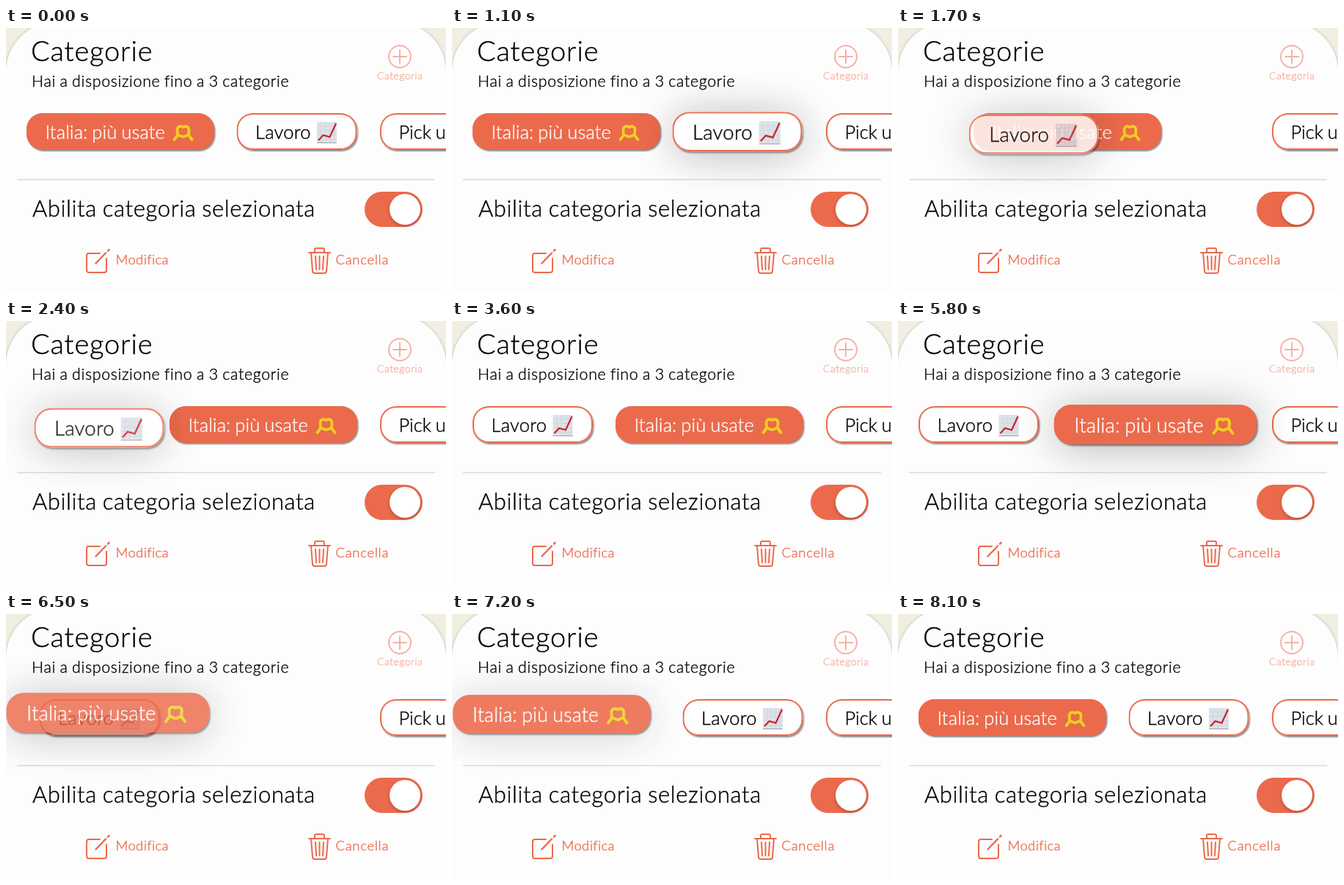
An HTML page that plays this animation: 600 px wide and 361 px high, repeating every 8200 ms.

```html
<!DOCTYPE html>
<html lang="it">
<head>
<meta charset="utf-8">
<style>
  html, body { margin: 0; width: 100%; height: 100%; overflow: hidden; background: #f0efe2; }
  #stage { position: relative; width: 600px; height: 361px; overflow: hidden; --accent: #ec6a4c; }
  svg { position: absolute; left: 0; top: 0; overflow: visible; }
  text {
    font-family: Lato, "Open Sans", sans-serif; font-weight: 300; word-spacing: -.04em;
    fill: currentColor; stroke: currentColor; stroke-width: .4px;
  }
  .icon { fill: none; stroke: var(--accent); stroke-width: 2; stroke-linecap: round; stroke-linejoin: round; }
  .accent { color: var(--accent); }
  .card {
    position: absolute; left: 0; top: -8px; width: 600px; height: 440px;
    border-radius: 68px; background: #fefdfe; box-shadow: 0 0 4px rgba(0,0,0,.2);
  }
  .toggle { position: absolute; left: 489px; top: 223px; width: 79px; height: 48px; border-radius: 24px; background: var(--accent); }
  .toggle i {
    position: absolute; left: 34px; top: 3px; width: 42px; height: 42px;
    border-radius: 50%; background: #fff; box-shadow: 0 2px 5px rgba(0,0,0,.25);
  }
  .pill {
    --lift: 0;
    position: absolute; left: 0; top: 0; height: 50px; border-radius: 22px; background: #fff; color: #000;
    box-shadow: inset 0 0 0 2px var(--accent), 1.5px 2px 2px rgba(0,0,0,.45),
      0 4px 56px rgba(0,0,0,calc(.3 * var(--lift)));
  }
  .pill text { font-size: 25.5px; }
  #italia { width: 256px; background: var(--accent); color: #fff; }
  #lavoro { width: 164px; }
  #pick { width: 190px; transform: translate(510px, 116px); }
</style>
</head>
<body>
<div id="stage">
  <div class="card"></div>
  <svg width="600" height="361">
    <path d="M15 206.500H585" stroke="#d9d8da" stroke-width="1.500"/>
    <text x="34" y="45" font-size="38" letter-spacing=".85">Categorie</text>
    <text x="35" y="79.500" font-size="21.300" letter-spacing=".7">Hai a disposizione fino a 3 categorie</text>
    <text x="36" y="257" font-size="31" letter-spacing=".63">Abilita categoria selezionata</text>
    <g class="accent">
      <g opacity=".5">
        <path class="icon" d="M522 39a15 15 0 1 0 30 0a15 15 0 1 0-30 0M528 39h18M537 30v18"/>
        <text x="506" y="70" font-size="14" letter-spacing=".5">Categoria</text>
      </g>
      <text x="149.500" y="322" font-size="18.500" letter-spacing=".4">Modifica</text>
      <text x="449.500" y="322" font-size="18.500" letter-spacing=".7">Cancella</text>
    </g>
    <g class="icon">
      <path d="M128 307H113q-3 0-3 3v20q0 3 3 3h21q3 0 3-3V314"/>
      <path d="M122.500 320.500L136 306.500M139 303.500l1.500-1.500" stroke-width="2.500"/>
      <path d="M413 306h29M421 306v-4q0-2 2-2h9q2 0 2 2v4M416 306l2 25q.2 3 3 3h13q3 0 3-3l2-25M422 311l1 18M427.500 311v18M433 311l-1 18"/>
    </g>
  </svg>
  <div class="toggle"><i></i></div>

  <div class="pill" id="pick">
    <svg><text x="25.500" y="35">Pick up</text></svg>
  </div>
  <div class="pill" id="lavoro">
    <svg>
      <text x="25.500" y="35" letter-spacing=".25">Lavoro</text>
      <g transform="translate(109.500 12)" fill="none">
        <path d="M0 0h27v29H0z" fill="#dde2e8"/>
        <path d="M0 5.500h27M0 11.500h27M0 17.500h27M0 23.500h27M5.500 0v29M11.500 0v29M17.500 0v29M23.500 0v29" stroke="#cfd7e0"/>
        <path d="M0 28.500h27" stroke="#9aa3ad"/>
        <path d="M2 25l6.500-7 9 2.500L26 2" stroke="#cb2027" stroke-width="2.200"/>
      </g>
    </svg>
  </div>
  <div class="pill" id="italia">
    <svg>
      <text x="25.500" y="35" letter-spacing=".1">Italia: più usate</text>
      <defs>
        <path id="hand" d="M2.500 24l4.500-6-.5-8Q8 4 14.500 7M7 17.500l6.500 2.500"/>
        <g id="hands"><use href="#hand"/><use href="#hand" transform="matrix(-1 0 0 1 29 0)"/></g>
      </defs>
      <g transform="translate(199 12)" fill="none" stroke-linecap="round" stroke-linejoin="round">
        <use href="#hands" stroke="#c88418" stroke-width="5.200"/>
        <use href="#hands" stroke="#f9c62f" stroke-width="3.800"/>
      </g>
    </svg>
  </div>
</div>
<script>
  const LOOP = 8200, STEP = 100, REST_Y = 141, HEIGHT = 50;
  const GRAB_SCALE = .08, GRAB_FADE = .18;
  const mix = (a, b, k) => a + (b - a) * k;
  const ease = (t, start, end) => {
    const k = Math.min(1, Math.max(0, (t - start) / (end - start)));
    return k * k * (3 - 2 * k);
  };

  // x values are pill centres
  const pills = {
    italia: { el: document.getElementById('italia'), width: 256, first: 156, second: 351 },
    lavoro: { el: document.getElementById('lavoro'), width: 164, first: 110, second: 396.5 }
  };
  const drags = [
    { pill: pills.lavoro, other: pills.italia, lift: [600, 1050], move: [1000, 2000], swap: [1510, 1960],
      drop: [2400, 2900], x: 127, y: 145.5 },
    { pill: pills.italia, other: pills.lavoro, lift: [5300, 5750], move: [5900, 6606], swap: [6432, 6882],
      drop: [7000, 7500], x: 125, y: 134 }
  ];

  function place({ el, width }, x, y = REST_Y, lift = 0, opacity = 1) {
    el.style.transform =
      `translate(${x - width / 2}px, ${y - HEIGHT / 2}px) scale(${1 + GRAB_SCALE * lift})`;
    el.style.opacity = opacity;
    el.style.zIndex = lift > 0 ? 2 : 1;
    el.style.setProperty('--lift', lift);
  }

  function draw(t) {
    const d = drags[t < 4400 ? 0 : 1];
    const { pill, other } = d;
    const move = ease(t, ...d.move), drop = ease(t, ...d.drop);
    const fade = ease(t, d.move[0], d.move[0] + 300) * (1 - drop);
    place(other, mix(other.first, other.second, ease(t, ...d.swap)));
    place(pill,
      mix(mix(pill.second, d.x, move), pill.first, drop),
      mix(mix(REST_Y, d.y, move), REST_Y, drop),
      ease(t, ...d.lift) * (1 - drop),
      1 - GRAB_FADE * fade);
  }

  function tick() {
    const t = performance.now() % LOOP;
    draw(Math.floor(t / STEP) * STEP);
    requestAnimationFrame(tick);
  }
  tick();
</script>
</body>
</html>
```
